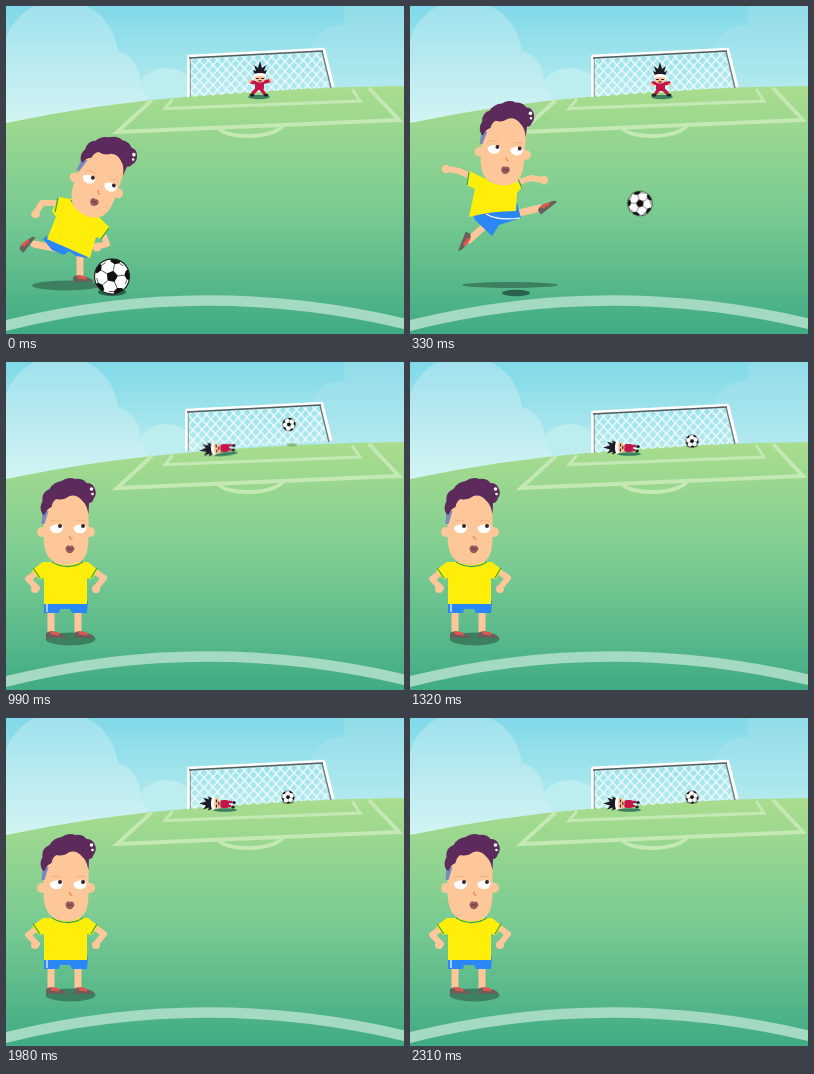
Recreate the animation shown at these times as an HTML page. Size 398x328 px, loop 3300 ms.

```html
<!DOCTYPE html>
<html lang="en">
<head>
<meta charset="utf-8">
<title>Penalty kick</title>
<style>
html, body { margin: 0; width: 100%; height: 100%; overflow: hidden; background: #42ad85; }
svg { display: block; width: 398px; height: 328px; }

/* A pose is held for one 330 ms slot, or from a slot to the end of the loop. */
.pose { opacity: 0; animation: slot 3300ms step-end infinite; animation-delay: calc(var(--i) * 330ms - 3300ms); }
.from3 { opacity: 0; animation: from3 3300ms step-end infinite; }
.from4 { opacity: 0; animation: from4 3300ms step-end infinite; }
.goal { animation: shake 3300ms step-end infinite; }
@keyframes slot { 0% { opacity: 1 } 10%, 100% { opacity: 0 } }
@keyframes from3 { 0% { opacity: 0 } 30%, 100% { opacity: 1 } }
@keyframes from4 { 0% { opacity: 0 } 40%, 100% { opacity: 1 } }
@keyframes shake {
  0%, 40%, 100% { transform: none }
  20% { transform: translate(-.5px, -.5px) }
  30% { transform: translate(-2px, -2px) }
}

.skin { fill: #fdc799; }
.limb { fill: none; stroke: #fdc799; stroke-width: 7; stroke-linejoin: round; stroke-linecap: round; }
.thin { stroke-width: 6; }
.shirt { fill: #ffee0a; }
.trim { fill: none; stroke: #3aa655; stroke-width: 1.3; }
.shorts { fill: #2b87f5; }
.stripe { fill: none; stroke: #fff; stroke-width: 1.2; }
.shade { fill: #3d805f; }
.spot { fill: #28624a; }
.kit { fill: #c4164a; }
.sleeve { fill: none; stroke: #c4164a; stroke-width: 3.4; stroke-linecap: round; stroke-linejoin: round; }
.boot { fill: #26222b; }
.line { fill: none; stroke: #c4e9b4; }
</style>
</head>
<body>
<svg viewBox="0 0 398 328" xmlns="http://www.w3.org/2000/svg">
<defs>
  <linearGradient id="sky" x2="0" y2="1">
    <stop stop-color="#80d9e9"/><stop offset="1" stop-color="#c8f1f0"/>
  </linearGradient>
  <linearGradient id="cloud" gradientUnits="userSpaceOnUse" x1="0" y1="0" x2="0" y2="115">
    <stop stop-color="#a0e1ed"/><stop offset="1" stop-color="#d2f4f3"/>
  </linearGradient>
  <linearGradient id="haze" gradientUnits="userSpaceOnUse" x1="0" y1="0" x2="0" y2="100">
    <stop stop-color="#92dcea"/><stop offset="1" stop-color="#b9ecef"/>
  </linearGradient>
  <linearGradient id="grass" gradientUnits="userSpaceOnUse" x1="0" y1="80" x2="0" y2="328">
    <stop stop-color="#aadd8e"/><stop offset=".5" stop-color="#7acb92"/><stop offset="1" stop-color="#40ab84"/>
  </linearGradient>
  <pattern id="net" width="9" height="10" patternUnits="userSpaceOnUse" patternTransform="skewY(-3)">
    <path d="M-1-1.1 10 11.1M10-1.1-1 11.1" stroke="#f4fcfc" stroke-width="1.3"/>
  </pattern>
  <clipPath id="round"><circle r="17.5"/></clipPath>

  <g id="ball">
    <circle r="17.5" fill="#fff"/>
    <g clip-path="url(#round)" fill="#111">
      <path d="M0-6 5.700-1.900 3.500 4.900-3.500 4.900-5.700-1.900Z"/>
      <g id="edge">
        <path d="M0-12.500 4.500-14.500 6-20H-6L-4.500-14.500Z"/>
        <path d="M0-6V-12.500M4.500-14.500 9-12.500" stroke="#444" stroke-width=".8" fill="none"/>
      </g>
      <use href="#edge" transform="rotate(72)"/>
      <use href="#edge" transform="rotate(144)"/>
      <use href="#edge" transform="rotate(216)"/>
      <use href="#edge" transform="rotate(288)"/>
    </g>
    <circle r="17.5" fill="none" stroke="#222" stroke-width="1.2"/>
  </g>

  <!-- Origin lies midway between the eyes. -->
  <g id="head">
    <circle class="skin" cx="-26.500" cy="4" r="5"/>
    <circle class="skin" cx="21.500" cy="4" r="5"/>
    <path class="skin" d="M-25-14Q-24-36 0-37Q20-36 20-14V10Q20 26 14 32Q6 38-3 37Q-15 36-20 29Q-25 22-25 8Z"/>
    <path d="M-26-17H-20L-24-4H-27Z" fill="#7d88bd"/>
    <path d="M-26-14Q-30-20-26-27Q-27-36-19-39Q-15-46-7-47Q0-52 7-49Q14-50 18-45Q24-45 26-40Q29-34 25-29Q24-25 20.500-25L20-14Q18-24 14-27Q8-34 1-32Q-6-27-12-29Q-16-27-17-21Q-22-19-24-13Z" fill="#5d2a5c"/>
    <g fill="#fff"><circle cx="23" cy="-39" r="1.800"/><circle cx="24" cy="-34" r="1.300"/></g>
    <path d="M-18-7Q-13-9-8-7M8-7Q13-9 17-7" fill="none" stroke="#efb084" stroke-width="1"/>
    <g fill="#fff">
      <path id="eye" d="M-18.500-1Q-12-6-5.500-2Q-5 5-12 5.300Q-18.500 5-18.500-1Z"/>
      <use href="#eye" x="23.500"/>
    </g>
    <circle cx="-8.500" cy="-2" r="2" fill="#36282c"/>
    <circle cx="14.500" cy="-2" r="2" fill="#36282c"/>
    <path d="M1 8Q2 12 4 11" fill="none" stroke="#f0915f" stroke-width="1.600"/>
    <path d="M-3 20Q-1 16 1 18Q5 16 6 21Q4 26 0 25Q-3 24-3 20Z" fill="#98595a"/>
    <path d="M-1 21Q2 20 4 22" fill="none" stroke="#623d44" stroke-width="1"/>
  </g>
  <g id="shoe">
    <path d="M-9 5V0Q-5-3 0-1L7 1Q12 3 11 5Z" fill="#69605d"/>
    <path d="M-5-1Q0-3 5 1L3 3Q0 1-3 2Z" fill="#e8524b"/>
  </g>
  <g id="legs">
    <path class="limb" d="M45 250V269M72 250V269"/>
    <use href="#shoe" x="49" y="271"/>
    <use href="#shoe" x="77" y="271"/>
  </g>

  <g id="face">
    <ellipse class="skin" rx="5.5" ry="4.5"/>
    <path d="M-6-1Q0-3 6-1V-4Q0-6-6-4Z" fill="#fff"/>
    <path d="M-4 .5H-1M1 .5H4" stroke="#36282c" stroke-width="1.200"/>
    <ellipse cy="2.800" rx="2" ry=".9" fill="#8b3b40"/>
  </g>
  <path id="spikes" d="M-5-3-7-8-4-7-6-13-2-10 0-17 2-10 6-13 4-7 7-8 5-3Q0-6-5-3Z" fill="#1e1b22"/>
  <g id="lying">
    <ellipse class="shade" cx="219" cy="92" rx="12" ry="1.800"/>
    <rect class="kit" x="214" y="82" width="9" height="8" rx="3"/>
    <path class="sleeve" d="M221 84 225 84M220 88H224" style="stroke-width:2.500"/>
    <ellipse class="boot" cx="228" cy="84.500" rx="1.800" ry="1.600"/>
    <ellipse class="boot" cx="227" cy="89" rx="1.800" ry="1.600"/>
    <g transform="translate(210 85.500) rotate(-90)"><use href="#spikes"/><use href="#face"/></g>
  </g>
</defs>

<!-- Scenery -->
<rect width="398" height="120" fill="url(#sky)"/>
<g fill="url(#haze)">
  <circle cx="334" cy="48" r="29"/>
  <circle cx="384" cy="10" r="46"/>
  <rect x="310" y="46" width="88" height="50"/>
</g>
<circle cx="160" cy="95" r="33" fill="#bdeeef"/>
<g fill="url(#cloud)">
  <circle cx="104" cy="74" r="30"/>
  <circle cx="54.500" cy="51" r="57.500"/>
  <path d="M0 60H125L146 100 0 120Z"/>
</g>
<path d="M0 117Q90 98 183 90.500Q290 81 398 80V328H0Z" fill="url(#grass)"/>
<g class="line">
  <path d="M146 94 111 126 393 114 363 82" stroke-width="3.900"/>
  <path d="M167 93 159 102.500 354 95 346 83" stroke-width="3"/>
  <path d="M212 121C216 133 270 134 278 118" stroke-width="3.900"/>
</g>
<path d="M-2 320Q197 270 400 318" fill="none" stroke="#a4dac1" stroke-width="10.500"/>

<g class="goal">
  <path d="M183 51 317 44 326 81 183 91Z" fill="url(#net)"/>
  <path d="M182.500 50V91" stroke="#fff" stroke-width="2.800"/>
  <path d="M184.300 52V91" stroke="#6f7f82" stroke-width=".8"/>
  <path d="M317.500 43 327 81" stroke="#fff" stroke-width="3.200"/>
  <path d="M316 45 325 82" stroke="#707577" stroke-width="1.300"/>
  <path d="M181.500 50 318.500 43" stroke="#fff" stroke-width="2.600"/>
  <path d="M183 52 317 45" stroke="#555b5e" stroke-width="1.400"/>
</g>

<!-- Keeper -->
<g class="pose" style="--i:0">
  <ellipse class="shade" cx="253" cy="91" rx="11" ry="2.200"/>
  <path class="sleeve" d="M252 77 245 76M254 77 263 75M252 82 247 87M254 82 258 87"/>
  <rect class="kit" x="249" y="75" width="9" height="9" rx="2"/>
  <circle class="skin" cx="244" cy="75" r="1.800"/><circle class="skin" cx="265" cy="74" r="1.800"/>
  <ellipse class="boot" cx="246" cy="89" rx="2.600" ry="1.500"/><ellipse class="boot" cx="260" cy="89" rx="2.600" ry="1.500"/>
  <use href="#spikes" x="254" y="72"/><use href="#face" x="254" y="72"/>
</g>
<g class="pose" style="--i:1">
  <ellipse class="shade" cx="252" cy="91" rx="11" ry="2.200"/>
  <path class="sleeve" d="M250 78 243 77M252 78 259 77M249 83 246 87M253 83 257 87"/>
  <rect class="kit" x="246" y="76" width="9" height="9" rx="2"/>
  <circle class="skin" cx="242" cy="79" r="1.800"/><circle class="skin" cx="260" cy="79" r="1.800"/>
  <ellipse class="boot" cx="244" cy="89" rx="2.600" ry="1.500"/><ellipse class="boot" cx="259" cy="89" rx="2.600" ry="1.500"/>
  <use href="#spikes" x="250" y="73"/><use href="#face" x="250" y="73"/>
</g>
<g class="pose" style="--i:2">
  <ellipse class="shade" cx="251" cy="90" rx="14" ry="2.500"/>
  <path class="sleeve" d="M249 81 244 76M253 81 258 76M249 83V87M254 83V87"/>
  <rect class="kit" x="247" y="78" width="9" height="7" rx="2"/>
  <circle class="skin" cx="244" cy="73" r="1.800"/><circle class="skin" cx="258" cy="73" r="1.800"/>
  <ellipse class="boot" cx="248" cy="89" rx="2.500" ry="1.700"/><ellipse class="boot" cx="255" cy="89" rx="2.500" ry="1.700"/>
  <use href="#spikes" transform="translate(251 73) scale(1 .75)"/><use href="#face" x="251" y="73"/>
</g>
<g class="pose" style="--i:3"><use href="#lying" transform="rotate(-7 219 86)"/></g>
<g class="from4"><use href="#lying"/></g>

<!-- Kicker -->
<g class="pose" style="--i:0">
  <ellipse class="shade" cx="60" cy="279.500" rx="34" ry="5"/>
  <path class="limb thin" d="M49 197 36 197 31 205"/>
  <circle class="skin" cx="29.500" cy="208" r="4.300"/>
  <path class="limb" d="M48 242 28 238"/>
  <use href="#shoe" transform="translate(19 237) rotate(-52) scale(.95)"/>
  <path class="limb" d="M74 248V270"/>
  <use href="#shoe" x="76" y="271"/>
  <path class="shorts" d="M40 230 85 248 81 252 70 250 63 245 58 249 46 244 37 233Z"/>
  <path class="limb thin" d="M97 228 101 238 93 240"/>
  <circle class="skin" cx="91" cy="241" r="4.500"/>
  <path class="shirt" d="M53 191 70 194 91 209 104 222 96 233 90 231 84 252 41 233 50 211 46 205Z"/>
  <path class="trim" d="M52 192 49 206M103 222 95 233M65 194Q72 207 90 208"/>
  <use href="#head" transform="translate(94 176.500) rotate(20) scale(.97)"/>
</g>
<g class="pose" style="--i:1">
  <ellipse class="shade" cx="100" cy="279" rx="48" ry="3"/>
  <path class="limb thin" d="M62 171 49 165 38 163"/>
  <circle class="skin" cx="36" cy="163" r="4.200"/>
  <path class="limb thin" d="M109 176 121 172 132 174"/>
  <circle class="skin" cx="134" cy="174" r="4.200"/>
  <path class="limb" d="M78 217 59 234"/>
  <path class="limb" d="M105 208 130 202"/>
  <use href="#shoe" transform="translate(57 236) rotate(112)"/>
  <use href="#shoe" transform="translate(135 199) rotate(-38)"/>
  <path class="shorts" d="M63 208 107 197 111 212 89 219 82 230 65 214Z"/>
  <path class="stripe" d="M76 208Q88 215 110 212"/>
  <path class="shirt" d="M59 165 76 173 104 174 113 180 107 187 106 205Q80 205 59 211L65 183 57 179Z"/>
  <path class="trim" d="M59 166 57 179M108 173 112 182M77 173Q90 182 104 174"/>
  <use href="#head" transform="translate(95.500 143.500) rotate(4) scale(.97)"/>
</g>
<g class="pose" style="--i:2">
  <ellipse class="shade" cx="65" cy="279" rx="29" ry="4.500"/>
  <use href="#legs" x="1"/>
  <path class="limb thin" d="M31 213 24 224 25 234"/>
  <path class="limb thin" d="M89 213 93 224 90 235"/>
  <circle class="skin" cx="25" cy="235" r="4.500"/><circle class="skin" cx="89" cy="237" r="4.500"/>
  <path class="shorts" d="M38 241H81L82 253H67L65 248H55L54 253H40Z"/>
  <path class="stripe" d="M43 243V252M77 243V252"/>
  <path class="shirt" d="M38 201 84 202 92 212 85 220 81 219V244H38V219L34 221 25 212Z"/>
  <path class="trim" d="M27 210 35 221M91 211 84 220M46 201Q62 210 77 202"/>
  <use href="#head" transform="translate(65.500 169) rotate(4)"/>
</g>
<g class="from3">
  <ellipse class="shade" cx="64.500" cy="277" rx="25" ry="6.500"/>
  <use href="#legs"/>
  <path class="limb thin" d="M30 211 22 217 31 226"/>
  <path class="limb thin" d="M91 211 98 216 90 226"/>
  <circle class="skin" cx="29" cy="227" r="4"/><circle class="skin" cx="90" cy="227" r="4"/>
  <path class="shorts" d="M38 239H82L81 251H66L64 247H54L53 251H38Z"/>
  <path class="stripe" d="M41 242V250"/>
  <path class="shirt" d="M37 200H82L92 208 86 217 81 216V242H38V216L33 217 26 208Z"/>
  <path class="trim" d="M27 206 34 216M91 206 85 216M46 200Q62 209 77 200"/>
  <use href="#head" transform="translate(62.500 166)"/>
</g>

<!-- Ball -->
<g class="pose" style="--i:0">
  <ellipse class="spot" cx="106" cy="286" rx="14" ry="4"/>
  <use href="#ball" transform="translate(106 270.500) rotate(12)"/>
</g>
<g class="pose" style="--i:1">
  <ellipse class="spot" cx="106" cy="287" rx="14" ry="3.300"/>
  <use href="#ball" transform="translate(230 197.500) rotate(-15) scale(.7)"/>
</g>
<g class="pose" style="--i:2">
  <ellipse cx="333" cy="92" rx="14" ry="4" fill="#67995f"/>
  <use href="#ball" transform="translate(312 73) rotate(40) scale(.35)"/>
</g>
<g class="pose" style="--i:3">
  <ellipse cx="286" cy="83" rx="5" ry="1.700" fill="#8dbd78"/>
  <use href="#ball" transform="translate(283 62.500) rotate(10) scale(.37)"/>
</g>
<g class="from4">
  <ellipse cx="282" cy="84" rx="6" ry="1.800" fill="#67995f"/>
  <use href="#ball" transform="translate(282 79) rotate(30) scale(.36)"/>
</g>
</svg>
</body>
</html>
```
